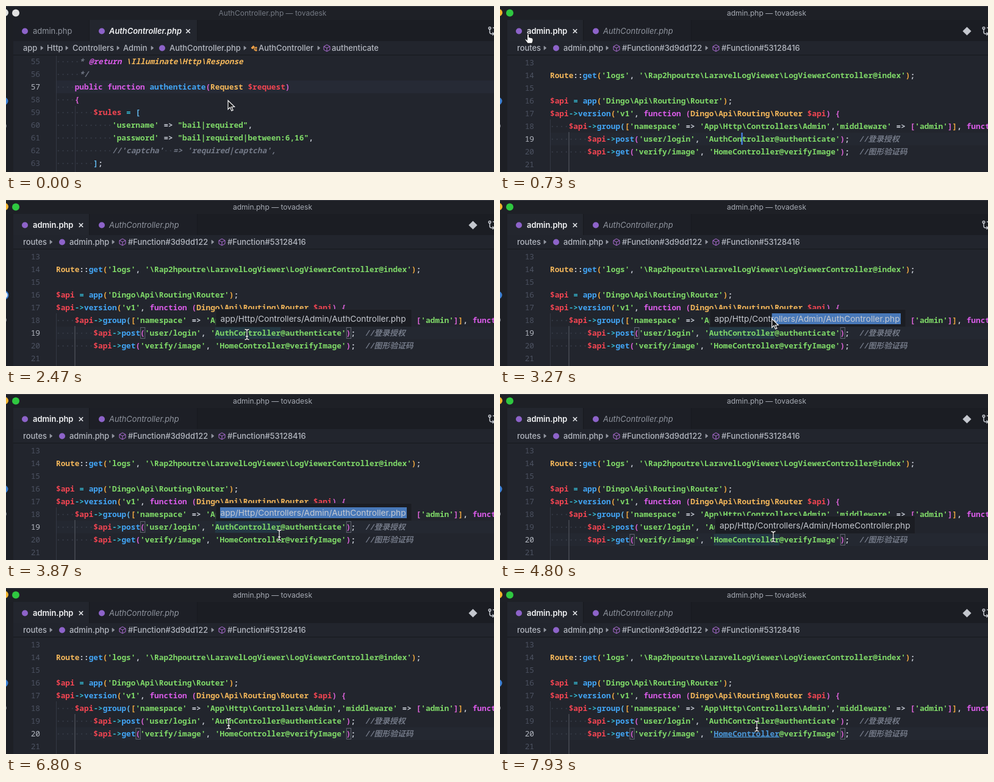
Write an HTML page that moves like this. It is 800 by 274 pixels and loops after 8000 ms.

```html
<!DOCTYPE html>
<html lang="en">
<head>
<meta charset="utf-8">
<title>Editor</title>
<style>
  html, body { margin: 0; width: 100%; height: 100%; overflow: hidden; background: #22252d; }
  svg { display: block; width: 800px; height: 274px; }
  text { white-space: pre; font: 500 12.9px Inter, "Open Sans", sans-serif; fill: #b4b8c1; }
  .code { font: 600 12.79px "Noto Sans Mono", "Noto Sans CJK SC", "DejaVu Sans Mono", monospace; }
  .num { font-weight: 400; fill: #4c5261; text-anchor: end; }
  .num.on { fill: #b3b7c0; }
  .title { font-size: 12px; font-weight: 400; text-anchor: middle; }
  .tip text { font-size: 13.65px; font-weight: 400; fill: #c6c9d0; }
  .p { fill: #d95be8 } .b { fill: #42a5f5 } .y { fill: #f2b65a } .r { fill: #f24552 }
  .g { fill: #7fd968 } .w { fill: #c5cad3 } .c { fill: #35b9d2 } .d { fill: #343944 }
  .k { fill: #737987; font-style: italic }
  .P { fill: #d95be8; font-style: italic } .Y { fill: #f2b65a; font-style: italic }
  .l { fill: #4a97d8; text-decoration: underline }
  .x { fill: #f0a840 } .u { fill: #da62d6 } .s { fill: #62b8ee }
</style>
</head>
<body>
<svg id="stage" viewBox="0 0 800 274"></svg>
<script>
const LOOP = 8000, STEP = LOOP / 120, CHAR = 7.674, LEFT = 82, ROW = 21;
const NS = 'http://www.w3.org/2000/svg';
const stage = document.getElementById('stage');

function add(parent, tag, attrs = {}, text) {
  const el = document.createElementNS(NS, tag);
  for (const key in attrs) el.setAttribute(key, attrs[key]);
  if (text !== undefined) el.textContent = text;
  return parent.appendChild(el);
}
const group = (parent = stage, attrs) => add(parent, 'g', attrs);
const rect = (p, x, y, width, height, fill, more) => add(p, 'rect', { x, y, width, height, fill, ...more });
const dot = (p, cx, cy, r, fill, more) => add(p, 'circle', { cx, cy, r, fill, ...more });
const path = (p, d, stroke, fill = 'none', more) => add(p, 'path', { d, stroke, fill, ...more });
const label = (p, x, y, text, more) => add(p, 'text', { x, y, ...more }, text);
const colX = col => LEFT + col * CHAR;

// Each line: indent, then pieces led by their colour class.
function codeLine(parent, y, indent, source) {
  const line = label(parent, LEFT, y, undefined, { class: 'code' });
  if (indent) add(line, 'tspan', { class: 'd' }, '·'.repeat(indent));
  if (source) for (const piece of source.split('¦')) add(line, 'tspan', { class: piece[0] }, piece.slice(1));
  return line;
}

function codeBlock(parent, first, y, lines) {
  const numbers = {};
  lines.forEach(([indent, source], i) => {
    numbers[first + i] = label(parent, 56, y + i * ROW, first + i, { class: 'code num' });
    codeLine(parent, y + i * ROW, indent, source);
  });
  return numbers;
}

function cube(p, x, y) {
  path(p, `M${x} ${y - 5.5}l5 2.7v5.6l-5 2.7l-5 -2.7v-5.6zm-5 2.7l5 2.7l5 -2.7m-5 2.7v5.6`, '#b06fd8');
}

function crumbs(p, items) {
  for (const [x, text] of items) label(p, x, 74, text);
}
const chevrons = (p, xs) => xs.forEach(x => path(p, `M${x - 2} 66l4 3.3l-4 3.3z`, '#9296a0', '#9296a0', { 'stroke-width': .6 }));
const fileMark = (p, x, y) => dot(p, x, y, 5, '#8d63c9');
const cross = (p, x) => path(p, `M${x - 3.2} 38.3l6.4 6.4m0 -6.4l-6.4 6.4`, '#e4e6ea', 'none', { 'stroke-width': 1.6 });

function tabs(p, active) {
  const split = 136.5;
  rect(p, 12, 23, 302, 35, '#1d1f26');
  if (active) rect(p, split, 23, 177, 35, '#23262e');
  else rect(p, 12, 23, split - 12, 35, '#23262e');
  rect(p, 136, 23, 1, 35, '#181a1f');
  rect(p, 313, 23, 1, 35, '#181a1f');
  fileMark(p, 31, 41.5);
  fileMark(p, 157, 41.5);
  const look = on => on ? 'fill:#f2f3f5;font-weight:600' : 'fill:#90959f;font-weight:400';
  label(p, 44, 46, 'admin.php', { style: look(!active) });
  label(p, 169, 46, 'AuthController.php', { style: look(active) + ';font-style:italic' });
  cross(p, active ? 298.5 : 123);
}

// Window frame
rect(stage, 0, 0, 800, 274, '#22252d');
rect(stage, 0, 0, 800, 23, '#1e2026');
rect(stage, 0, 0, 800, 1, '#3a3d44');
rect(stage, 0, 23, 800, 35, '#1b1d23');
rect(stage, 0, 23, 12, 251, '#1d1f25');
rect(stage, 12, 80, 788, 2, '#1b1e24');

// Controller file, window inactive
const before = group();
label(before, 437, 16, 'AuthController.php — tovadesk', { class: 'title', style: 'fill:#747983' });
dot(before, -2, 11, 6, '#e2e2e2');
dot(before, 16, 11.5, 6, '#e2e2e2');
tabs(before, true);
crumbs(before, [[28, 'app'], [67, 'Http'], [109, 'Controllers'], [192, 'Admin'],
  [268, 'AuthController.php'], [414, 'AuthController'], [534, 'authenticate']]);
chevrons(before, [59, 100, 184, 240, 392, 513]);
fileMark(before, 256, 69.5);
path(before, 'M402 69l3.5 -3.5l2 2l-3.5 3.5zm4 0h3m-2 0v4h2', '#e59a45', '#e59a45');
dot(before, 410, 69, 1.7, '#e59a45');
dot(before, 410, 73, 1.7, '#e59a45');
cube(before, 526, 69.5);
rect(before, LEFT, 123, 718, ROW, '#262a35');
rect(before, LEFT, 82, 1, 192, '#343844');
rect(before, 113, 165, 1, 109, '#343844');
codeBlock(before, 55, 95.5, [
  [5, 'k* ¦P@return¦k ¦Y\\Illuminate\\Http\\Response'],
  [5, 'k*/'],
  [4, 'ppublic function ¦bauthenticate¦u(¦yRequest ¦r$request¦u)'],
  [4, 'u{'],
  [8, 'r$rules¦c = ¦s['],
  [12, "g'username'¦w => ¦g\"bail|required\"¦w,"],
  [12, "g'password'¦w => ¦g\"bail|required|between:6,16\"¦w,"],
  [12, "k//'captcha'¦d··¦k=> 'required|captcha',"],
  [8, 's]¦w;'],
])[57].classList.add('on');

// Routes file, window active
const after = group();
label(after, 437, 16, 'admin.php — tovadesk', { class: 'title', style: 'fill:#a6aab3' });
dot(after, -2, 11, 6, '#f5b52e');
dot(after, 16, 11.5, 6, '#2fc840');
tabs(after, false);
crumbs(after, [[28, 'routes'], [104, 'admin.php'], [200, '#Function#3d9dd122'], [363, '#Function#53128416']]);
chevrons(after, [74, 176, 339]);
fileMark(after, 92, 69.5);
cube(after, 191, 69.5);
cube(after, 354, 69.5);
const rowHighlight = rect(after, LEFT, 209, 718, ROW, '#242831');
rect(after, LEFT, 187, 1, 87, '#343844');
rect(after, 112.5, 208, 1, 66, '#5a5e69');
const word = (col, y) => rect(after, colX(col), y, 14 * CHAR, ROW - 2, '#243844');
const authWord = word(34, 210);
const homeWord = word(35, 231);
const numbers = codeBlock(after, 13, 97.5, [
  [0, ''],
  [0, "yRoute¦w::¦bget¦x(¦g'logs'¦w, ¦g'\\Rap2hpoutre\\LaravelLogViewer\\LogViewerController@index'¦x)¦w;"],
  [0, ''],
  [0, "r$api¦c = ¦bapp¦x(¦g'Dingo\\Api\\Routing\\Router'¦x)¦w;"],
  [0, "r$api¦c->¦bversion¦x(¦g'v1'¦w, ¦pfunction ¦u(¦yDingo\\Api\\Routing\\Router ¦r$api¦u) {"],
  [4, "r$api¦c->¦bgroup¦s(¦x[¦g'namespace'¦w => ¦g'App\\Http\\Controllers\\Admin'¦w,¦g'middleware'¦w => ¦u[¦g'admin'¦u]¦x]¦w, ¦pfunction"],
  [8, "r$api¦c->¦bpost¦u(¦g'user/login'¦w, ¦g'AuthController@authenticate'¦u)¦w;  ¦k//登录授权"],
  [8, "r$api¦c->¦bget¦u(¦g'verify/image'¦w, ¦g'¦gHomeController¦g@verifyImage'¦u)¦w;  ¦k//图形验证码"],
  [0, ''],
]);
const linkWord = [...after.querySelectorAll('tspan')].find(s => s.textContent === 'HomeController');

function brackets(open, y) {
  const g = group(after);
  for (const col of [open, 62])
    rect(g, colX(col) + .5, y, CHAR - .5, ROW - 3, 'none', { stroke: '#626672' });
  return g;
}
const authBrackets = brackets(18, 210.5);
const homeBrackets = brackets(17, 231.5);
const caret = rect(after, 0, 0, 2, ROW - 1, '#4d90ff');

function tooltip(x, y, width, file) {
  const g = group(after, { class: 'tip' });
  rect(g, x + .5, y + .5, width, 29, '#1b1d23', { stroke: '#24272e' });
  const mark = rect(g, x + 8, y + 7, 0, 18, '#4878b8');
  label(g, x + 8, y + 20.5, `app/Http/Controllers/Admin/${file}.php`);
  return { g, mark };
}
const authTip = tooltip(343.5, 180, 321, 'AuthController');
const homeTip = tooltip(352, 201, 328, 'HomeController');

// Side badges and toolbar
const badge = dot(stage, -3, 157, 6.5, '#3b7fd4', { 'stroke-width': 2 });
dot(stage, -4, 198, 5, '#8c9099');
const diamond = rect(stage, 760.5, 36.5, 10, 10, '#c4c7ce', { transform: 'rotate(45 765.5 41.5)' });
const compare = group(stage, { fill: 'none', stroke: '#c4c7ce', 'stroke-width': 1.5 });
add(compare, 'circle', { cx: 793, cy: 36.5, r: 1.8 });
add(compare, 'path', { d: 'M793 38.5v4.5q0 3 3 3h4M797.5 43.5l2.5 2.5l-2.5 2.5M798 36h2' });

// Pointers, drawn around their hot spot
const pointers = { arrow: group(), hand: group(), beam: group() };
path(pointers.arrow, 'M0 0v14.5l3.4 -3.2l2.4 5.6l2.4 -1l-2.4 -5.4h4.8z', '#f4f4f4', '#16171a', { 'stroke-width': 1.2 });
path(pointers.hand, 'M-1.5 0q1.5 -2 3 0v5q1.5 -1 2.5 .5q1.6 -.8 2.3 .7q1.7 -.4 1.7 1.6v3l-1.5 4h-7l-4.5 -6q.5 -2 2.2 -.8l1.3 1.4z',
  '#16171a', '#f6f6f6');
const beam = 'M-3.5 -8.5q3 0 3.5 2v13q-.5 2 -3.5 2M3.5 -8.5q-3 0 -3.5 2M3.5 8.5q-3 0 -3.5 -2M-2 3h4';
path(pointers.beam, beam, '#15161a', 'none', { 'stroke-width': 3 });
path(pointers.beam, beam, '#f0f0f0', 'none', { 'stroke-width': 1.3 });

const mouse = [
  [0, 364, 156, 'arrow'], [130, 364, 156, 'arrow'], [600, 46, 47, 'hand'], [930, 46, 47, 'beam'],
  [1500, 395, 222, 'beam'], [2600, 395, 222, 'arrow'], [2950, 655, 196, 'arrow'],
  [3450, 354, 196, 'beam'], [3800, 448, 233, 'beam'], [5150, 448, 236, 'arrow'],
  [5550, 471, 213, 'arrow'], [5900, 471, 213, 'beam'], [6500, 365, 224, 'beam'],
  [7150, 365, 224, 'beam'], [7800, 421, 228, 'beam'], [LOOP, 421, 228, 'beam'],
];
const OPEN = 650, CLICK = 4250;
const shown = [
  [before, 0, OPEN], [after, OPEN, LOOP],
  [authTip.g, 1900, 4150], [authWord, 1900, 4150], [authBrackets, 950, CLICK],
  [homeTip.g, 4700, 6150], [homeWord, 4700, 6150], [homeBrackets, CLICK, LOOP],
];
const show = (el, on) => { el.style.display = on ? '' : 'none'; };
const ease = p => p * p * (3 - 2 * p);

function draw(t) {
  for (const [el, from, to] of shown) show(el, t >= from && t < to);
  const clicked = t >= CLICK, reading = t >= 2800 && !clicked;
  show(diamond, t >= OPEN && !reading);

  rowHighlight.setAttribute('y', clicked ? 230 : 209);
  numbers[19].classList.toggle('on', !clicked);
  numbers[20].classList.toggle('on', clicked);
  caret.setAttribute('x', colX(clicked ? 48 : 41) - 1);
  caret.setAttribute('y', clicked ? 230 : 209);
  show(caret, !reading && (t - (clicked ? CLICK : OPEN)) % 1000 < 500);
  linkWord.setAttribute('class', t >= 7800 ? 'l' : 'g');

  const busy = t >= 1900 && t < 2650;
  badge.setAttribute('fill', busy ? '#e8edf5' : '#3b7fd4');
  badge.setAttribute('stroke', busy ? '#3b7fd4' : 'none');

  const i = mouse.findIndex((m, n) => n && t < m[0]) - 1;
  const [t0, x0, y0, kind] = mouse[i], [t1, x1, y1] = mouse[i + 1];
  const p = ease((t - t0) / (t1 - t0));
  const x = x0 + (x1 - x0) * p, y = y0 + (y1 - y0) * p;
  for (const name in pointers) show(pointers[name], name === kind);
  pointers[kind].setAttribute('transform', `translate(${x} ${y})`);

  // Dragging leftwards selects the path from its end.
  const start = t < 2950 ? 657 : t < 3450 ? Math.max(351, x) : 351;
  authTip.mark.setAttribute('x', start);
  authTip.mark.setAttribute('width', 657 - start);
}

function tick() {
  draw(Math.floor(performance.now() % LOOP / STEP) * STEP);
  requestAnimationFrame(tick);
}
tick();
</script>
</body>
</html>
```
